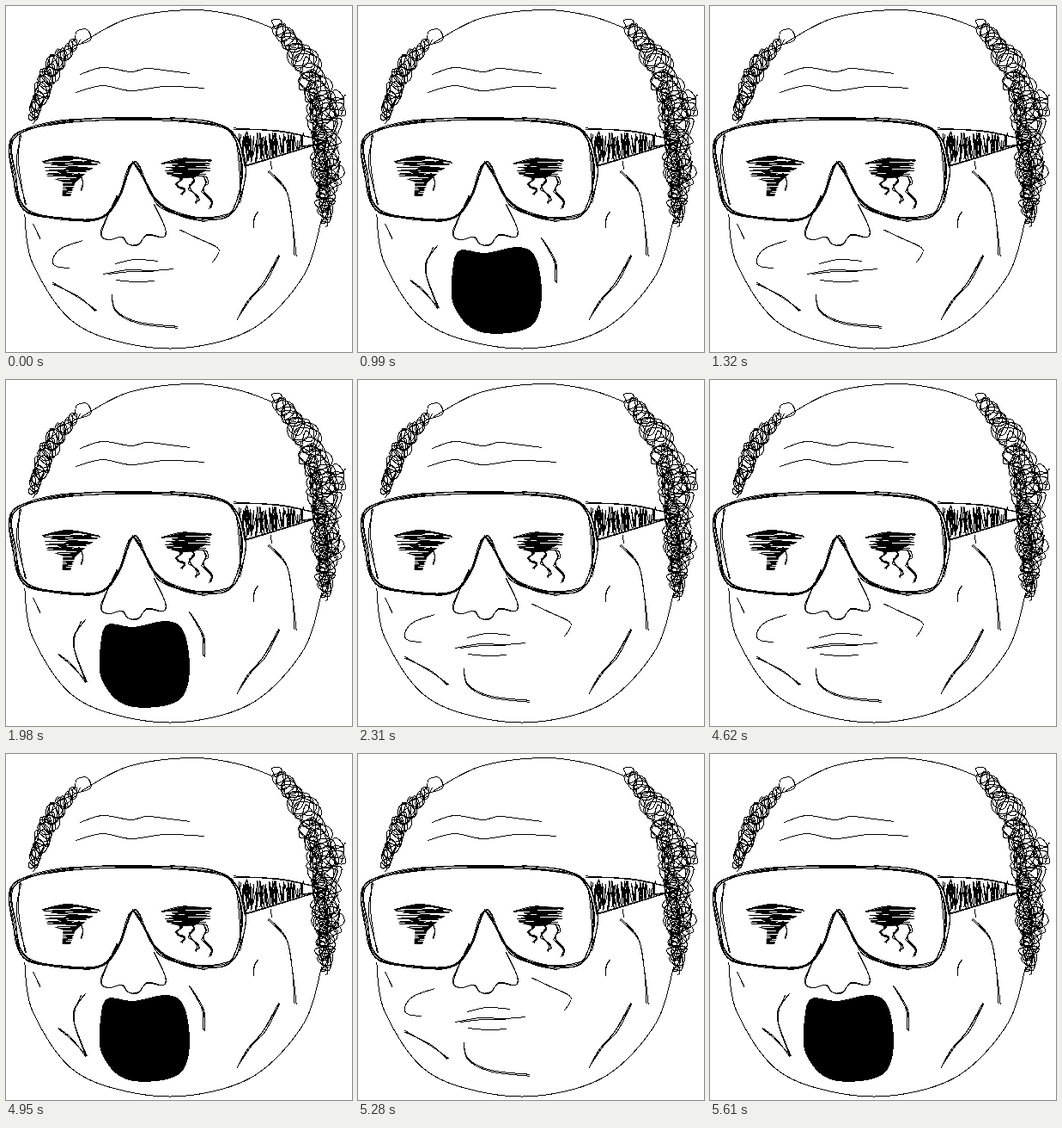
An HTML page for the animation above (5940 ms loop, 403 by 402 pixels).

```html
<!DOCTYPE html>
<html lang="en">
<head>
<meta charset="utf-8">
<title>Shouting doodle</title>
<style>
  html, body { margin: 0; width: 100%; height: 100%; overflow: hidden; background: #fff; }
  svg { display: block; width: 403px; height: 402px; }
  path { fill: none; stroke: #000; stroke-width: 1; shape-rendering: crispEdges; }
  .solid { fill: #000; }
  #shut { animation: shut 5940ms step-end infinite; }
  #open { animation: open 5940ms step-end infinite; }
  @keyframes shut {
    0%, 22.222%, 38.888%, 77.777%, 88.888% { visibility: visible; }
    16.666%, 33.333%, 61.111%, 83.333%, 94.444%, 100% { visibility: hidden; }
  }
  @keyframes open {
    0%, 22.222%, 38.888%, 77.777%, 88.888% { visibility: hidden; }
    16.666%, 33.333%, 61.111%, 83.333%, 94.444%, 100% { visibility: visible; }
  }
</style>
</head>
<body>
<svg viewBox="0 0 403 402">
  <defs id="defs"></defs>
  <g transform="translate(.5 .5)">
    <g id="face"></g>
    <g id="shut"></g>
    <g id="open"></g>
  </g>
</svg>
<script>
const $ = id => document.getElementById(id);
const face = $('face'), shut = $('shut'), shout = $('open'), defs = $('defs');
const { PI, sin, cos, min, max } = Math;

let seed = 7;
const rnd = () => (seed = seed * 16807 % 2147483647) / 2147483647;
const spread = n => (rnd() * 2 - 1) * n;
const parse = s => s.split(' ').map(p => p.split(',').map(Number));

function add(parent, tag, attrs) {
  const el = document.createElementNS('http://www.w3.org/2000/svg', tag);
  for (const k in attrs) el.setAttribute(k, attrs[k]);
  return parent.appendChild(el);
}

// Smooth curve through every point
function smooth(p, closed) {
  const n = p.length;
  const at = i => closed ? p[(i + n) % n] : p[max(0, min(n - 1, i))];
  let d = 'M' + p[0];
  for (let i = 0; i < (closed ? n : n - 1); i++) {
    const [a, b, c, e] = [at(i - 1), at(i), at(i + 1), at(i + 2)];
    const h = b.map((v, k) => v + (c[k] - a[k]) / 6);
    const t = c.map((v, k) => v - (e[k] - b[k]) / 6);
    d += `C${h} ${t} ${c}`;
  }
  return d;
}

// Pen line, gone over several times with an unsteady hand
function line(parent, pts, times = 1, wobble = 0, closed = false) {
  const p = typeof pts === 'string' ? parse(pts) : pts;
  for (let i = 0; i < times; i++) {
    const shaky = p.map(q => q.map(v => v + spread(wobble)));
    add(parent, 'path', { d: smooth(shaky, closed) });
  }
}

// Back-and-forth scribble clipped to an outline
function hatch(pts, strokes, upright) {
  const p = parse(pts), id = 'clip' + defs.childElementCount;
  add(add(defs, 'clipPath', { id }), 'polygon', { points: pts });
  const [x, y] = [0, 1].map(k => {
    const v = p.map(q => q[k]), lo = min(...v);
    return { lo, size: max(...v) - lo };
  });
  const zig = Array.from({ length: strokes }, (_, i) => {
    const along = i / strokes + spread(.06), across = i % 2 ? 1 - rnd() * .3 : rnd() * .3;
    const [u, v] = upright ? [along, across] : [across, along];
    return [x.lo + u * x.size, y.lo + v * y.size];
  });
  add(face, 'path', { d: 'M' + zig.join('L'), 'clip-path': `url(#${id})` });
}

// Loops along a spine, widest in the middle
function curl(pts, turns, thin, thick, tall = 1) {
  const p = parse(pts), n = turns * 6;
  const loops = Array.from({ length: n }, (_, i) => {
    const u = i / n, s = u * (p.length - 1), k = s | 0;
    const [x, y] = p[k].map((v, j) => v + (p[k + 1][j] - v) * (s - k));
    const r = (thin + (thick - thin) * sin(PI * u)) * (.45 + .65 * rnd());
    const a = i * 1.06 + spread(.3);
    return [x + r * cos(a), y + r * tall * sin(a)];
  });
  add(face, 'path', { d: smooth(loops) });
}

// Wavy tear running down and to the right
function drip(x, y, drop) {
  const wave = Array.from({ length: 9 }, (_, i) =>
    [x + i * drop / 32 + 4 * sin(i * PI / 2.6), y + i * drop / 8]);
  line(face, wave, 4, 1.5);
}

// Head
line(face, '88,42 142,14 215,4 270,11 312,26');
line(face, '21,241 30,298 75,364 140,392 215,396 290,372 347,312 367,246', 1, .4);
line(face, '86,79 112,71 145,76 163,72 190,75 214,78');
line(face, '81,100 112,92 145,98 185,93 231,95');

// Hair
curl('82,40 56,66 41,98 29,132', 30, 4, 10, 1.5);
line(face, '62,54 82,45 98,39 94,27 82,29 80,40');
curl('313,20 350,65 370,125 372,185 371,248', 50, 8, 20);
curl('355,75 364,140 369,200 371,252', 34, 4, 9, 1.8);
curl('388,102 382,128', 4, 11, 13);
curl('380,178 378,212', 4, 10, 13);

// Glasses
line(face, '8,152 60,135 150,130 225,134 261,145 273,185 268,228 250,245 205,243 172,222 148,181 130,222 108,246 65,247 21,235 9,195', 5, 2.2, true);
line(face, '17,148 13,185 22,232', 2, 1.5);
line(face, '190,129 240,134 266,150 278,188 271,230', 2, 1.5);
line(face, '147,180 166,207 182,235 230,249', 2, 1.5);
line(face, '265,142 320,145 375,157', 2, 1);
line(face, '277,186 325,171 373,157', 2, 1);
line(face, '346,147 345,162 374,157', 2, 1);
hatch('268,144 346,149 345,164 277,185', 100, true);

// Eyes
hatch('42,180 72,174 110,181 90,196 80,205 74,222 65,220 66,204 48,198', 70);
hatch('180,184 206,176 240,178 238,197 205,200 188,196', 44);
line(face, '43,181 72,175 109,181', 3, 1.2);
line(face, '181,183 206,177 239,179', 3, 1.2);
line(face, '85,194 89,204 87,214', 3, 1);
drip(199, 196, 22);
drip(213, 196, 32);
drip(228, 196, 38);

// Nose and creases
line(face, '130,220 111,261 118,271 134,268 142,277 154,276 164,265 182,268 185,258 172,230', 2, 1.1);
line(face, '32,253 40,271', 2, 1);
line(face, '308,180 309,190');
line(face, '306,192 326,214 334,250 337,289', 2, 1.6);
line(face, '293,239 289,246 288,258', 2, .6);
line(face, '317,290 300,322 282,342 270,363', 3, 1.6);

// Mouth closed
line(shut, '89,272 64,281 54,294 58,302 74,304');
line(shut, '201,259 223,270 247,282 240,297', 1, .5);
line(shut, '127,299 150,294 177,296');
line(shut, '113,311 142,306 168,307 195,305');
line(shut, '119,311 145,308 171,308');
line(shut, '128,318 150,320 173,319');
line(shut, '53,322 84,338 104,354', 2, 1.2);
line(shut, '123,335 128,354 154,368 199,373', 2, 1.2);

// Mouth open
const mouth = parse('118,284 148,287 186,280 206,292 213,335 204,368 175,379 135,375 111,346 110,308');
add(shout, 'path', { class: 'solid', d: smooth(mouth, true) });
line(shout, '92,277 77,304 93,350', 2, 1);
line(shout, '87,280 79,300 80,319');
line(shout, '60,318 76,331 93,351', 2, 1);
line(shout, '214,270 229,296 230,321', 3, 1.2);
</script>
</body>
</html>
```
